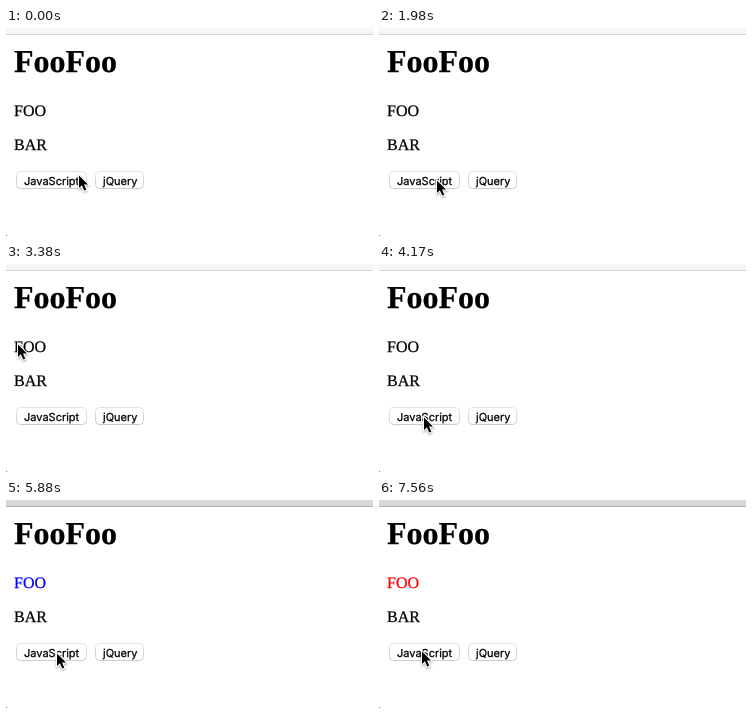
Animation, 367 px wide and 208 px high, one loop 8 s. Source, as an HTML page with a canvas:

```html
<!DOCTYPE html>
<html lang="en">
<head>
<meta charset="utf-8">
<title>FooFoo</title>
<style>
html, body { margin: 0; width: 100%; height: 100%; overflow: hidden; background: #fff; }
canvas { display: block; }
</style>
</head>
<body>
<canvas id="stage" width="367" height="208"></canvas>
<script>
const ctx = document.getElementById('stage').getContext('2d');
const LOOP = 8000;
const SERIF = '"Liberation Serif", serif';

const linear = p => p;
const smooth = p => p * p * (3 - 2 * p);

// A straight or gently bent path; sideways and vertical travel may ease differently.
const glide = ([x0, y0], [x1, y1], easeX = smooth) => p =>
  [x0 + (x1 - x0) * easeX(p), y0 + (y1 - y0) * smooth(p)];

// One full turn over the first paragraph.
const circle = p => {
  const angle = Math.PI * (2.2 * p - 0.65);
  return [26.5 + 16.5 * Math.cos(angle), 75 + 12 * Math.sin(angle)];
};

const edge = [72, 146], rest = [63, 154], label = [61, 153], script = [44, 152], query = [102, 152];
const moves = [
  { start: 90, end: 180, steps: 2, path: glide(edge, rest) },
  { start: 540, end: 720, steps: 2, path: glide(rest, label) },
  { start: 1980, end: 2760, steps: 10, path: glide(label, [19, 75], linear) },
  { start: 2850, end: 3650, steps: 10, path: circle },
  { start: 3740, end: 4170, steps: 6, path: glide(circle(1), script) },
  { start: 5880, end: 6230, steps: 5, path: glide(script, query) },
  { start: 7210, end: 7560, steps: 5, path: glide(query, [42, 150]) }
];

function cursorAt(time) {
  const move = moves.findLast(({ start }) => start <= time);
  if (!move) return edge;
  const { start, end, steps, path } = move;
  const step = 1 + Math.floor((time - start) / (end - start) * (steps - 1) + 0.05);
  return path(Math.min(step / steps, 1)).map(Math.round);
}

// The hairline stroke gives the text its slightly heavy screen rendering.
function text(string, x, baseline, font, color = '#000') {
  ctx.font = font;
  ctx.fillStyle = ctx.strokeStyle = color;
  ctx.lineWidth = 0.25;
  ctx.fillText(string, x, baseline);
  ctx.strokeText(string, x, baseline);
}

function shade(top, bottom) {
  const gradient = ctx.createLinearGradient(0, 143, 0, 161);
  gradient.addColorStop(0, top);
  gradient.addColorStop(1, bottom);
  return gradient;
}

function button(string, x, width, pressed) {
  ctx.beginPath();
  ctx.roundRect(x + 0.5, 143.5, width - 1, 17, 4);
  ctx.fillStyle = pressed ? shade('#55a5fb', '#0a60e8') : '#fff';
  ctx.fill();
  ctx.strokeStyle = pressed ? shade('#4a98f0', '#0850d0') : shade('#e4e4e4', '#cacaca');
  ctx.lineWidth = 1;
  ctx.stroke();
  text(string, x + 8, 156.5, '11px Inter, sans-serif', pressed ? '#fff' : '#000');
}

const arrow = new Path2D('M1 1.5V14L3.9 11.3L6.2 16.6L8.3 15.7L6 10.5H10Z');

function cursor([x, y]) {
  ctx.save();
  ctx.translate(x, y);
  ctx.shadowColor = 'rgba(0, 0, 0, 0.35)';
  ctx.shadowBlur = 2;
  ctx.shadowOffsetY = 1;
  ctx.strokeStyle = '#fff';
  ctx.lineWidth = 2;
  ctx.stroke(arrow);
  ctx.shadowColor = 'transparent';
  ctx.fillStyle = '#000';
  ctx.fill(arrow);
  ctx.restore();
}

function draw(time) {
  ctx.textRendering = 'geometricPrecision';
  ctx.fillStyle = '#fff';
  ctx.fillRect(0, 0, 367, 208);

  const focused = time >= 4350;
  ctx.fillStyle = focused ? '#d8d8d8' : '#f6f6f6';
  ctx.fillRect(0, 0, 367, 6);
  ctx.fillStyle = focused ? '#b0b0b0' : '#d2d2d2';
  ctx.fillRect(0, 6, 367, 1);
  ctx.fillStyle = '#777';
  ctx.fillRect(0, 207, 1, 1);

  const fooColor = time >= 6670 ? '#f00' : time >= 5250 ? '#00f' : '#000';
  text('FooFoo', 8, 44, `bold 32px ${SERIF}`);
  text('FOO', 8, 87.5, `16px ${SERIF}`, fooColor);
  text('BAR', 8, 121.5, `16px ${SERIF}`);
  button('JavaScript', 10, 71, time >= 5070 && time < 5250);
  button('jQuery', 89, 49, time >= 6500 && time < 6670);
  cursor(cursorAt(time));
}

const began = performance.now();
function tick() {
  draw((performance.now() - began) % LOOP);
  requestAnimationFrame(tick);
}
tick();
</script>
</body>
</html>
```
